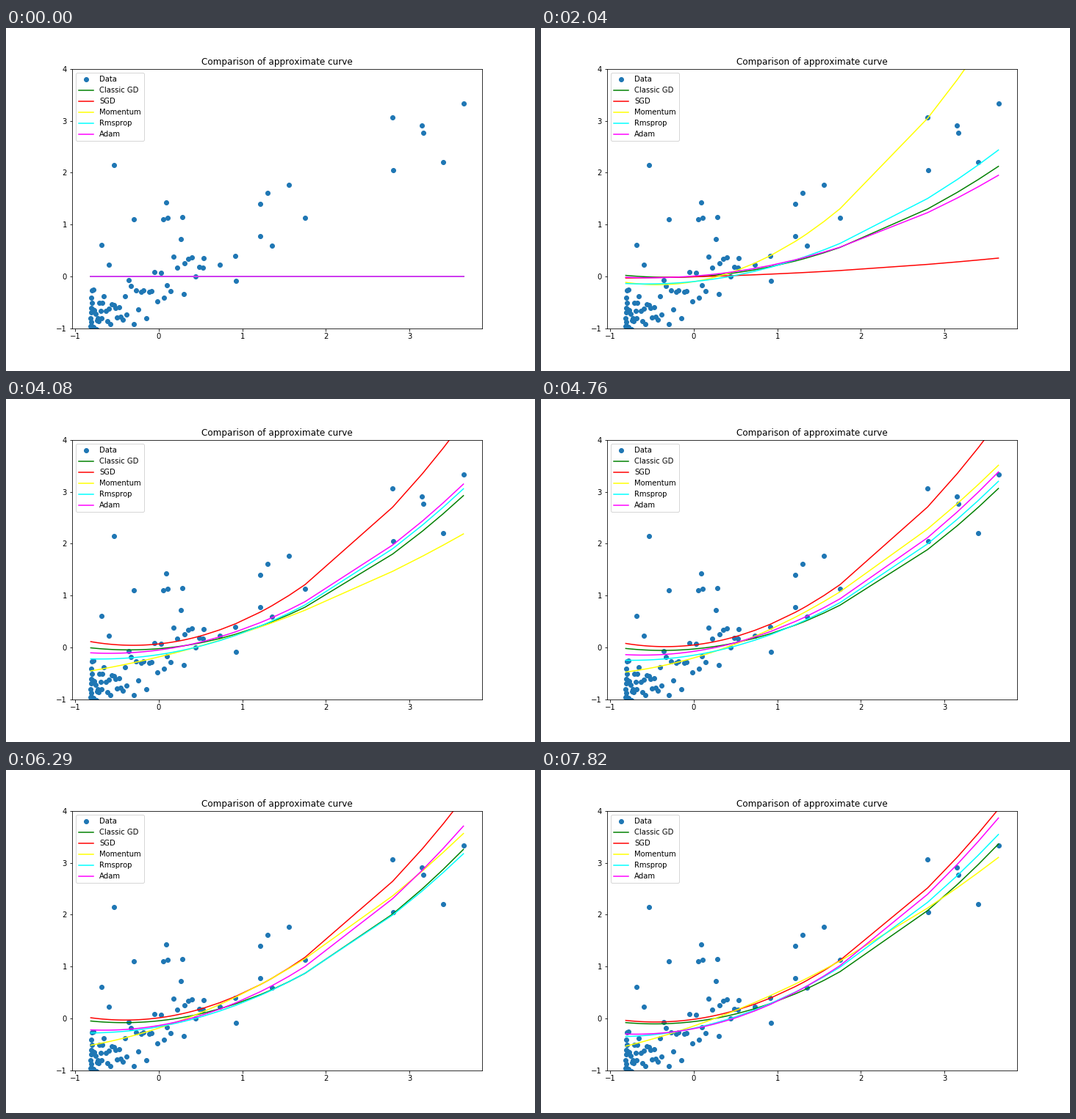
Animation, 720 px wide and 468 px high, one loop 7.99 s. Source, as a matplotlib script:

```python
import numpy as np
import matplotlib.pyplot as plt
from matplotlib.animation import FuncAnimation

plt.rcParams["text.kerning_factor"] = 6

FRAMES, INTERVAL = 47, 170
HEIGHT = 468
XLIM, YLIM = (-1.035, 3.868), (-1, 4)
LEFT, MID, RIGHT = -0.812, 1.75, 3.645  # nodes that fix each parabola

# Isolated samples in stage pixels; the dense cloud is generated
landmarks = [
    (622.6, 103), (526, 122), (566, 133), (568, 143), (527, 194), (595, 183),
    (385, 214), (356, 225), (346, 240), (407, 259), (346, 284), (362, 297),
    (312, 311), (313, 345), (291, 323), (269, 314), (268, 327), (242, 363),
    (147, 187), (218, 238), (240, 258), (214, 261), (220, 259), (174, 261),
    (130, 296), (140, 323),
]


def cloud(n=64):
    """Samples crowded at the left edge, scattered about a rising trend."""
    rng = np.random.default_rng(5)
    x = LEFT + 1.3 * np.linspace(0, 1, n) ** 2.3
    return x, -0.15 + 0.72 * x + rng.normal(0, 0.28, n)


def drifting(growth, start, drift, t):
    """Node heights that grow together while their balance drifts."""
    return growth * (np.array(start) + np.array(drift) * t)


def classic_gd(t):
    return drifting(1 - 0.92 ** t, (0.068, 0.87, 3.33), (-0.0033, 0.0011, 0.0024), t)


def sgd(t):
    # one outlying sample causes the leap between steps 15 and 16
    steps = (0, 15, 16, 24, 32, 46)
    return np.array([np.interp(t, steps, h) for h in (
        (0, -0.04, 0.06, 0.11, 0.04, -0.04),
        (0, 0.14, 0.94, 1.21, 1.21, 1.12),
        (0, 0.44, 3.42, 4.36, 4.37, 4.04))])


def momentum(t):
    # damped swing between turning points half a period apart
    turns = (0, 5.1, 1.8, 4.2, 2.9, 3.7)
    i, s = divmod(t / 10.6, 1)
    a, b = turns[int(i)], turns[int(i) + 1]
    right = a + (b - a) * (1 - np.cos(np.pi * s)) / 2
    sag = 0.6 * (1 - np.exp(-(t / 18) ** 2))
    return np.array([0.02 * right - sag, 0.245 * right + 0.0075 * t, right])


def rmsprop(t):
    wobble = 1 + 0.05 * (t / 46) ** 2 * np.cos(0.35 * (t - 46))
    return drifting((1 - 0.88 ** t) * wobble,
                    (-0.12, 0.76, 3.0), (-0.0047, 0.004, 0.0085), t)


def adam(t):
    return drifting(np.tanh(t / 22.5), (0.06, 1.19, 4.0), (-0.0081, -0.003, 0), t)


def parabola(heights, x):
    """Quadratic through the three node heights."""
    p, q, r = heights
    first = (q - p) / (MID - LEFT)
    second = ((r - q) / (RIGHT - MID) - first) / (RIGHT - LEFT)
    return p + (x - LEFT) * (first + second * (x - MID))


fig = plt.figure(figsize=(10, HEIGHT / 72), dpi=72, facecolor="white")
fig.subplots_adjust(left=0.125, right=0.9, bottom=0.125, top=0.88)
ax = fig.add_subplot()
ax.set(xlim=XLIM, ylim=YLIM, xticks=range(-1, 4), yticks=range(-1, 5))
ax.set_title("Comparison of approximate curve")

pixels = np.array([(x, HEIGHT - y) for x, y in landmarks])
spots = ax.transData.inverted().transform(pixels).T
xs, ys = np.hstack([spots, cloud()])
grid = np.sort(xs)

ax.plot(xs, ys, "o", color="#1f77b4", label="Data")
curves = []
for name, color, heights in (
        ("Classic GD", "green", classic_gd), ("SGD", "red", sgd),
        ("Momentum", "yellow", momentum), ("Rmsprop", "cyan", rmsprop),
        ("Adam", "magenta", adam)):
    line, = ax.plot(grid, 0 * grid, color=color, label=name)
    curves.append((line, heights))
ax.legend(loc="upper left")


def update(step):
    for line, heights in curves:
        line.set_ydata(parabola(heights(step), grid))
    return [line for line, _ in curves]


anim = FuncAnimation(fig, update, frames=FRAMES, interval=INTERVAL,
                     init_func=lambda: update(0), repeat=True, repeat_delay=0)
plt.show()
```
